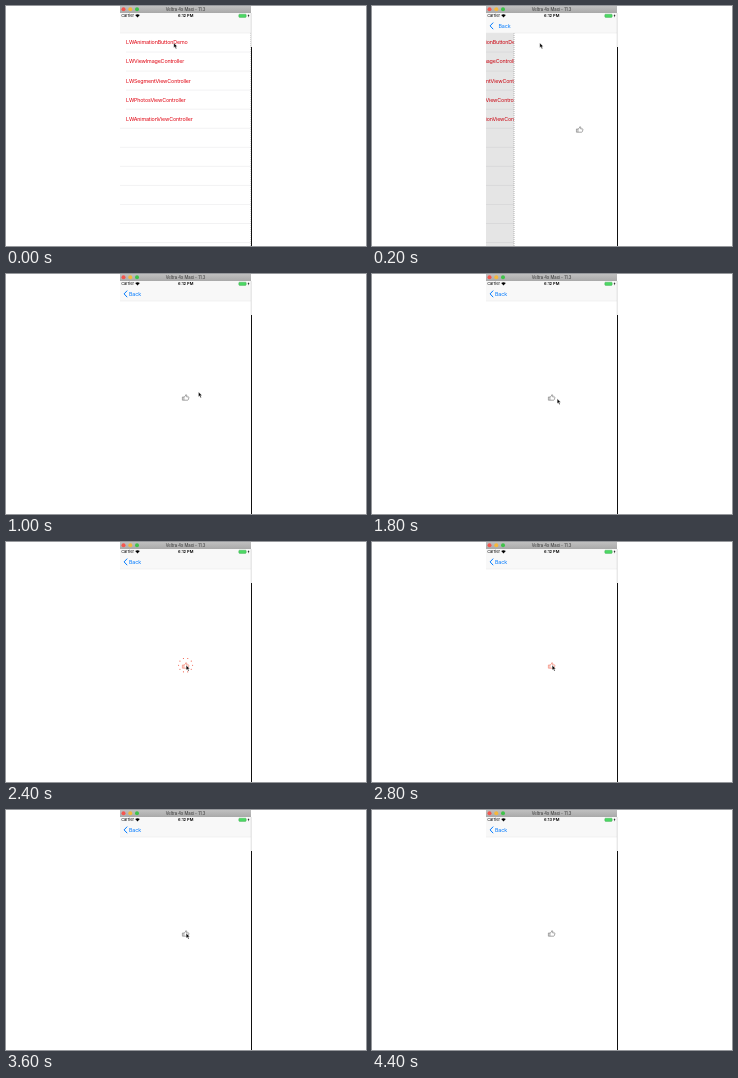
These frames come from a looping animation (360x240 px, 4800 ms). An HTML page:

```html
<!DOCTYPE html>
<html lang="en">
<head>
<meta charset="utf-8">
<style>
  html, body { margin: 0; width: 100%; height: 100%; overflow: hidden; background: #fff; }
  svg { display: block; width: 360px; height: 240px; font-family: Inter, Roboto, sans-serif; }
  .body { font-size: 5.38px; letter-spacing: -.16px; }
  .line { stroke: #e4e4e6; stroke-width: .5; }
</style>
</head>
<body>
<svg viewBox="0 0 360 240">
  <defs>
    <linearGradient id="metal" x2="0" y2="1">
      <stop stop-color="#c0c0c0"/><stop offset="1" stop-color="#a9a9a9"/>
    </linearGradient>
    <clipPath id="screen"><path d="M114 7h131v233H114z"/></clipPath>
  </defs>
  <g clip-path="url(#screen)">
    <g id="list" class="body" fill="#e0000f"></g>
    <path id="dim" d="M114 27h131v213H114z" opacity=".1"/>
    <g id="page">
      <path d="M114 27h131v213H114z" fill="#fff"/>
      <path id="edge" d="M114 27v213" stroke="#999" stroke-width=".7" stroke-dasharray="1 1"/>
      <g id="burst" fill="#f0503c"></g>
      <g id="thumb" fill="none" stroke-width=".65" stroke-linejoin="round">
        <path d="M-3.2-.6h1.5v3.2h-1.5zM-1.7-.5L-.2-1.5L.2-2.9Q1.3-3 1.2-1.7L1-.7H2.8Q3.5-.6 3.3.1L2.7 2.1Q2.5 2.6 2 2.6H-1.7"/>
      </g>
    </g>
    <path d="M114 7h131v20H114z" fill="#f8f8f8"/>
    <path d="M114 27h131" class="line"/>
    <g id="back" class="body" fill="#007aff">
      <path d="M121.2 16.6L118.1 19.9L121.2 23.2" fill="none" stroke="#007aff" stroke-width="1"/>
      <text id="backText" y="21.8">Back</text>
    </g>
    <g font-size="4">
      <text x="115.2" y="11.3" letter-spacing="-.05">Carrier</text>
      <path d="M129.2 9.1Q131.5 7.3 133.8 9.1L131.5 11.5z"/>
      <text id="clock" x="179.7" y="11.3" font-weight="600" text-anchor="middle"></text>
      <rect x="232.8" y="8.2" width="7.4" height="3.2" rx=".8" fill="#4cd964" stroke="#3b9f4b" stroke-width=".4"/>
      <path d="M242.9 8l-1.3 2h.9l-.4 1.6 1.4-2.1h-.9z"/>
    </g>
  </g>
  <path d="M114 0h131v7H114z" fill="url(#metal)"/>
  <circle cx="117.5" cy="3.3" r="2" fill="#f4564f"/>
  <circle cx="124.3" cy="3.3" r="2" fill="#f5b73b"/>
  <circle cx="131" cy="3.3" r="2" fill="#3fc24a"/>
  <text x="179.5" y="4.9" font-size="4.2" fill="#333" text-anchor="middle">Veltra 4x Maxi - 11.3</text>
  <path d="M245.2 7v34" stroke="#bbb" stroke-width=".5"/>
  <path d="M245.5 41v199" stroke="#111"/>
  <path id="cursor" d="M0 0v4.8l1.1-1 .9 2 .9-.4-.9-1.9h1.5z" stroke="#fff" stroke-width=".35"/>
</svg>
<script>
const $ = id => document.getElementById(id);
const STEP = 200, LOOP = 4800, WIDTH = 131, ROW = 19.05;
const rows = ['AnimationButtonDemo', 'ViewImageController', 'SegmentViewController',
  'PhotosViewController', 'AnimationViewController'];

let list = '<path d="M114 27h131v213H114z" fill="#fff"/>';
for (let i = 0; i < 12; i++) {
  const y = 27 + i * ROW;
  if (rows[i]) list += `<text x="120" y="${y + 11.4}">LW${rows[i]}</text>`;
  list += `<path class="line" d="M${i < 4 ? 120 : 114} ${y + ROW}H245"/>`;
}
$('list').innerHTML = list;
$('burst').innerHTML = '<circle r=".55"/>'.repeat(10);

// [time, x, y]
const pointer = [[0, 167.8, 37], [600, 171.5, 49], [800, 191.5, 105],
  [1000, 192.5, 118], [1800, 185.2, 124.8], [2000, 180.2, 123.3]];
const move = (el, x, y = 0, scale = 1) =>
  el.setAttribute('transform', `translate(${x} ${y}) scale(${scale})`);
const show = (el, on) => el.setAttribute('visibility', on ? 'visible' : 'hidden');

function draw(now) {
  const t = Math.floor(now % LOOP / STEP) * STEP;
  const push = t < 200 ? 0 : t < 400 ? .786 : 1;
  move($('list'), -.3 * WIDTH * push);
  move($('page'), WIDTH * (1 - push));
  show($('dim'), push);
  show($('back'), push);
  show($('edge'), push < 1);
  $('backText').setAttribute('x', push < 1 ? 126.5 : 123);
  $('clock').textContent = t < 4000 ? '6:12 PM' : '6:13 PM';

  const liked = t >= 2200 && t < 3200;
  const scale = t === 2200 || t === 3400 ? 1.3 : t === 3200 ? .6 : 1;
  move($('thumb'), 179.6, 123.6, scale);
  $('thumb').setAttribute('stroke', liked ? '#f27a68' : '#777');

  show($('burst'), t === 2400 || t === 2600);
  const radius = t < 2600 ? 7 : 10.2;
  [...$('burst').children].forEach((dot, i) => {
    const a = i * Math.PI / 5;
    move(dot, 179.6 + radius * Math.cos(a), 123.2 + radius * Math.sin(a));
  });

  const [, x, y] = pointer.findLast(p => p[0] <= t);
  move($('cursor'), x, y);
  show($('cursor'), t < 4400);
}

const start = performance.now();
(function tick() {
  draw(performance.now() - start);
  requestAnimationFrame(tick);
})();
</script>
</body>
</html>
```
